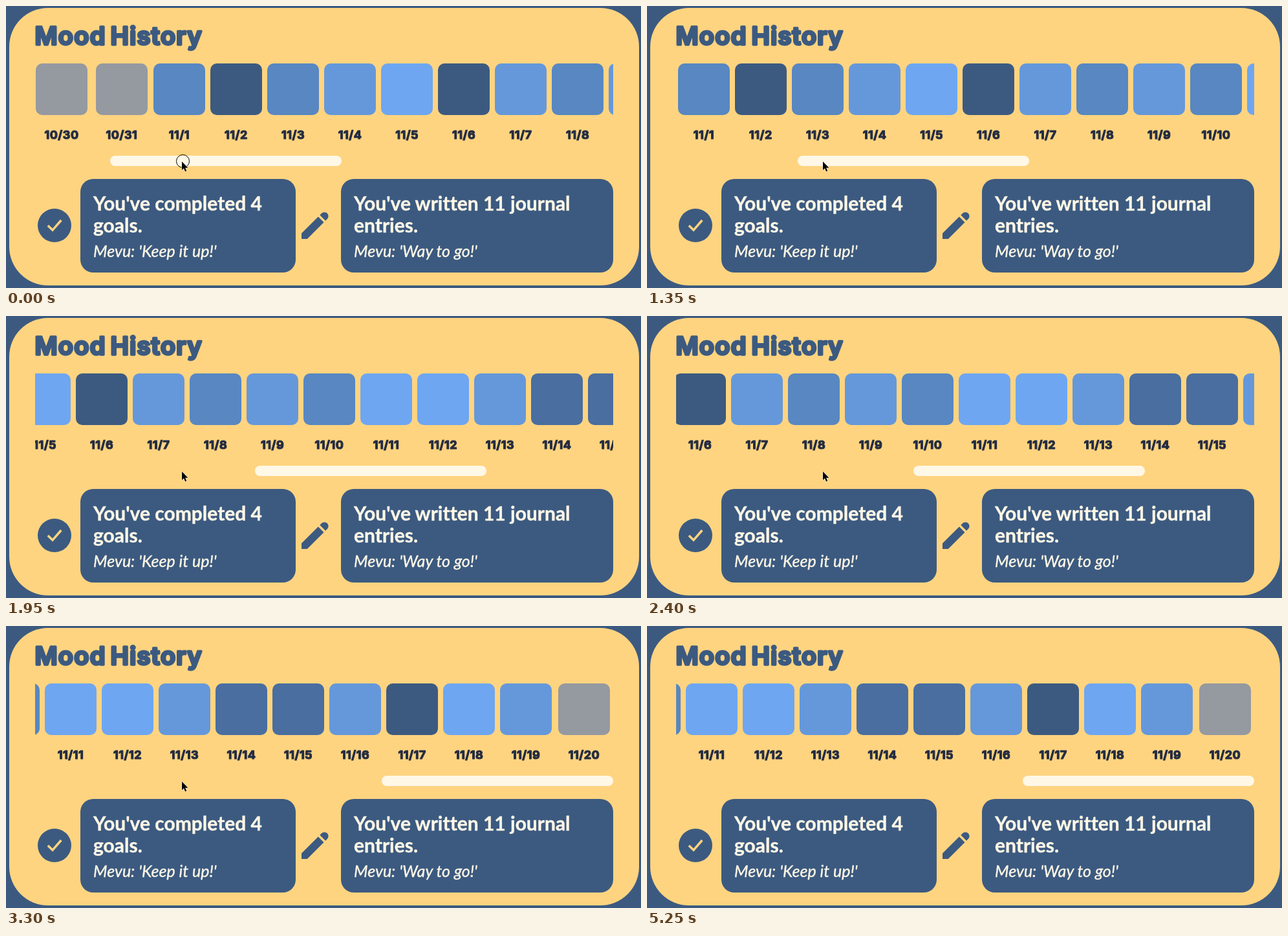
Write an HTML page that moves like this. It is 982 px wide and 437 px high and loops after 5.55 s.

```html
<!DOCTYPE html>
<html lang="en">
<head>
<meta charset="utf-8">
<title>Mood History</title>
<style>
  html, body { margin: 0; width: 100%; height: 100%; overflow: hidden; background: #3c5a80; }
  svg { display: block; width: 982px; height: 437px; }
  .navy { fill: #3c5a80; }
  .cream { fill: #fff8e7; }
  .round { font-family: Inter, sans-serif; font-optical-sizing: none; stroke-linejoin: round; }
  .title { font-size: 38px; font-weight: 600; letter-spacing: 1.3px; fill: #3c5a80; stroke: #3c5a80; stroke-width: 3.6px; }
  .date { font-size: 18px; font-weight: 700; letter-spacing: .5px; text-anchor: middle; fill: #252d42; stroke: #252d42; stroke-width: 1.2px; }
  .big, .small { font-variant-ligatures: none; stroke: #fff8e7; stroke-width: .4px; }
  .big { font: bold 30px Lato, sans-serif; font-variant-ligatures: none; }
  .small { font: italic 25px Lato, sans-serif; font-variant-ligatures: none; }
</style>
</head>
<body>
<svg viewBox="0 0 982 437">
  <clipPath id="view"><rect x="45" y="80" width="894" height="140"/></clipPath>
  <g id="page">
    <rect x="5" y="3" width="974" height="430" rx="60" fill="#ffd480"/>
    <text class="round title" y="60"><tspan x="44.5">Mood</tspan> <tspan x="161.5">History</tspan></text>
    <g clip-path="url(#view)"><g id="strip"></g></g>
    <rect id="thumb" class="cream" x="161" y="232" width="358" height="16" rx="8"/>

    <circle class="navy" cx="75" cy="340" r="26"/>
    <path d="M64.8 340.3L72 347.3L85.3 332" fill="none" stroke="#ffd480" stroke-width="3.5"/>
    <path class="navy" d="M457 361V352.2L482.8 326.4L491.5 335.2L465.8 361ZM485.3 323.9L488 321.2A6.2 6.2 0 0 1 496.8 330L494 332.7Z"/>

    <rect class="navy" x="115" y="268" width="333" height="145" rx="20"/>
    <rect class="navy" x="518" y="268" width="421" height="145" rx="20"/>
    <g class="cream big">
      <text x="135" y="317">You've completed 4</text>
      <text x="135" y="351">goals.</text>
      <text x="538" y="317">You've written 11 journal</text>
      <text x="538" y="351">entries.</text>
    </g>
    <g class="cream small">
      <text x="135" y="389">Mevu: 'Keep it up!'</text>
      <text x="538" y="389">Mevu: 'Way to go!'</text>
    </g>
  </g>
  <circle id="ring" cx="273.5" cy="240.5" r="10" fill="none" stroke="#000"/>
  <path id="cursor" d="M2 1V14.2L5 11.4L7.1 16.4L9.2 15.5L7.1 10.7H11.4Z" fill="#000" stroke="#fff" paint-order="stroke"/>
</svg>
<script>
const LOOP = 5550, TICK = 150;
const $ = id => document.getElementById(id);
const strip = $('strip'), thumb = $('thumb'), page = $('page'), ring = $('ring'), cursor = $('cursor');

// One letter per day: gray, then moods from dark to light
const COLORS = { g: '#9599a0', a: '#3c5a80', b: '#496e9f', c: '#5887c1', d: '#6598da', e: '#6ea6f1' };
const MOODS = 'ggcacdeadcdceedbbdaedg';

function add(tag, attrs, text = '') {
  const el = document.createElementNS('http://www.w3.org/2000/svg', tag);
  for (const key in attrs) el.setAttribute(key, attrs[key]);
  el.textContent = text;
  strip.append(el);
}

let left = 39;
[...MOODS].forEach((mood, i) => {
  const label = i < 2 ? `10/${i + 30}` : `11/${i - 1}`;
  // Labels with several wide digits widen their slot
  const wide = label.replace(/[1/]/g, '').length;
  const slot = 88 + 3 * Math.max(0, wide - 1);
  const x = Math.round(left + (slot - 80) / 2);
  add('rect', { x, y: 89, width: 80, height: 80, rx: 10, fill: COLORS[mood] });
  add('text', { class: 'round date', x: x + 40, y: 206.3 }, label);
  left += slot;
});

// Each drag of the strip: start ms, end ms, scroll reached
const DRAGS = [[300, 900, 136], [1200, 1950, 560], [2250, 2700, 815], [3000, 3300, 1048]];

const progress = (t, from, to) => Math.min(1, Math.max(0, (t - from) / (to - from)));
const smooth = u => u * u * (3 - 2 * u);
const scrollAt = t => DRAGS.reduce((pos, [from, to, end]) =>
  pos + (end - pos) * smooth(progress(t, from, to)), 0);

// The pointer rests, disappears, then glides out at the lower right
function pointerAt(t) {
  if (t < 4200) return [270, 240];
  if (t < 4350 || t > 5100) return null;
  const u = progress(t, 4350, 5100);
  return [358 + 582 * u * (2 - u), 272 + 161 * u];
}

const nudgeAt = t => t < 4050 || t >= 4500 ? 0 : t < 4350 ? -3 : -1;
const move = (el, x, y = 0) => el.setAttribute('transform', `translate(${x} ${y})`);
const show = (el, on) => el.setAttribute('visibility', on ? 'visible' : 'hidden');

const start = performance.now();
function draw() {
  const now = (performance.now() - start) % LOOP;
  const t = now - now % TICK;
  const scroll = Math.round(scrollAt(t)), pos = pointerAt(t);
  move(strip, -scroll);
  thumb.setAttribute('x', Math.round(160.8 + scroll * .4006));
  move(page, nudgeAt(t));
  show(ring, t < TICK);
  show(cursor, pos);
  if (pos) move(cursor, ...pos.map(Math.round));
  requestAnimationFrame(draw);
}
draw();
</script>
</body>
</html>
```
